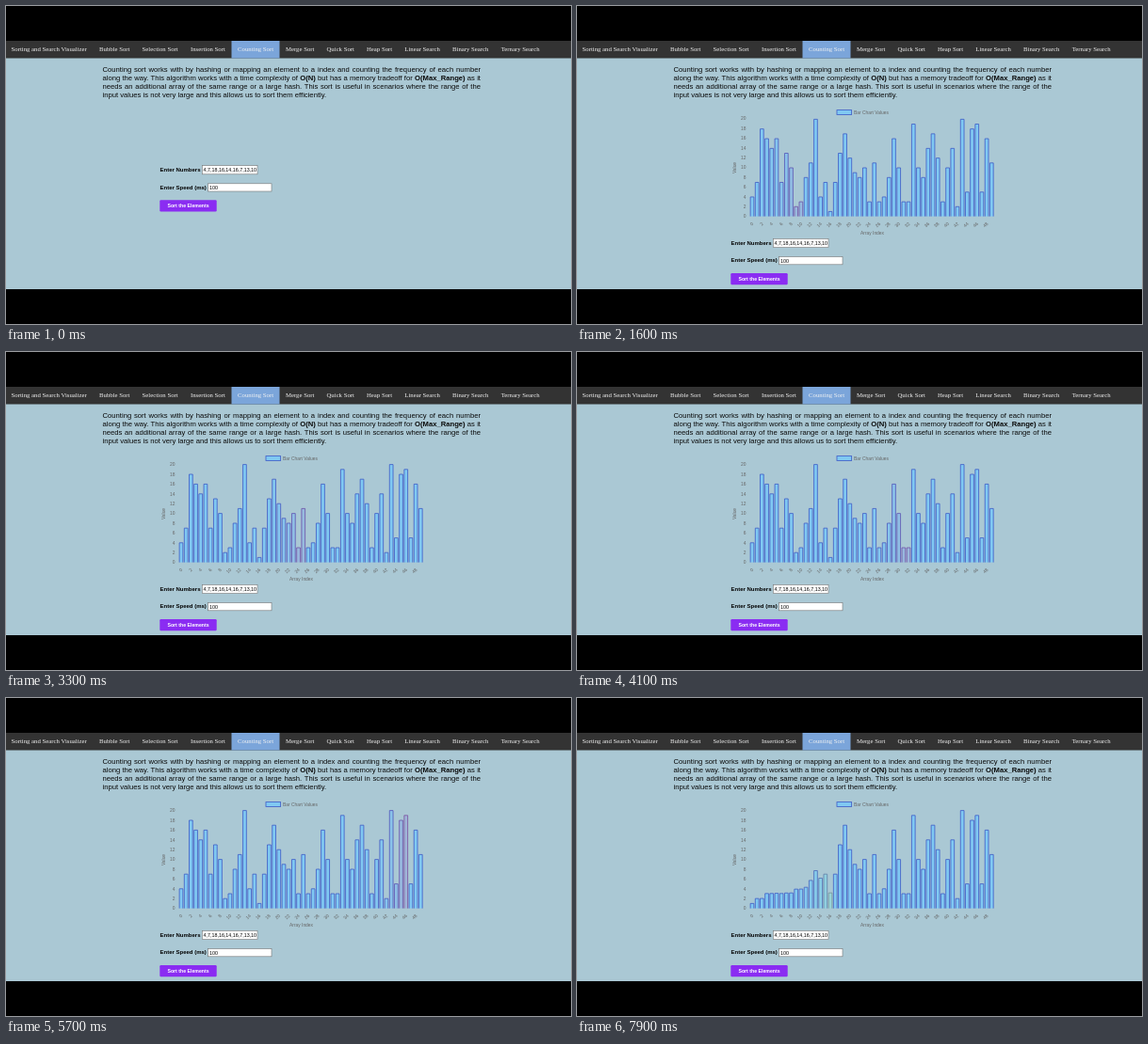
Write an HTML page that moves like this. It is 600 by 338 pixels and loops after 8000 ms.

```html
<!DOCTYPE html>
<html lang="en">
<head>
<meta charset="utf-8">
<title>Counting Sort</title>
<style>
html, body { margin: 0; width: 100%; height: 100%; overflow: hidden; background: #000; }
#stage { position: absolute; left: 0; top: 0; width: 600px; height: 338px; overflow: hidden; }
svg { position: absolute; left: 0; top: 0; }
svg text { font-family: "Liberation Sans", Arial, sans-serif; }
#nav text { font: 6.75px "Liberation Serif", "Times New Roman", serif; fill: #f2f2f2; }
#intro { position: absolute; left: 102.5px; top: 63.2px; width: 401.5px; color: #0a0a0a;
  font: 7.66px/9px "Liberation Sans", Arial, sans-serif; }
#intro div { white-space: nowrap; text-align: justify; text-align-last: justify; }
#intro div:last-child { text-align-last: left; }
#form .label { font-size: 6px; font-weight: bold; fill: #050505; }
#form .field { font-size: 5.35px; fill: #000; }
#form .box { fill: #fff; stroke: #767676; stroke-width: .6; }
#form .go { font-size: 5.2px; font-weight: bold; fill: #fff; }
#chart text { font-size: 4.9px; fill: #666; }
#chart rect, #bars path { stroke-width: .85; }
</style>
</head>
<body>
<div id="stage">
  <svg width="600" height="338" viewBox="0 0 600 338">
    <rect y="37" width="600" height="264" fill="#aac8d4"/>
    <rect y="37" width="600" height="18.5" fill="#333"/>
    <rect x="239.5" y="37" width="51" height="18.5" fill="#7ba5da"/>
    <g id="nav"></g>
    <g id="form">
      <text class="label" x="163.5" y="176">Enter Numbers</text>
      <rect class="box" x="208.3" y="169.6" width="58.7" height="9.2"/>
      <text class="field" x="209.6" y="176.2">4,7,18,16,14,16,7,13,10</text>
      <text class="label" x="163.5" y="194.5">Enter Speed (ms)</text>
      <rect class="box" x="214.6" y="188.8" width="67.4" height="8.2"/>
      <text class="field" x="216" y="194.8">100</text>
      <rect x="163.3" y="206.2" width="60.4" height="12.2" rx="1.2" fill="#8a2cf2"/>
      <text class="go" x="193.5" y="214.2" text-anchor="middle">Sort the Elements</text>
    </g>
    <g id="chart">
      <rect id="key" x="276" y="110.6" width="15.6" height="4.9"/>
      <text x="294" y="114.9">Bar Chart Values</text>
      <text x="313.5" y="242.7" text-anchor="middle">Array Index</text>
      <text transform="translate(169.4 172) rotate(-90)" text-anchor="middle">Value</text>
      <g id="ticks"></g>
      <g id="bars"></g>
    </g>
  </svg>
  <div id="intro">
    <div>Counting sort works with by hashing or mapping an element to a index and counting the frequency of each number</div>
    <div>along the way. This algorithm works with a time complexity of <b>O(N)</b> but has a memory tradeoff for <b>O(Max_Range)</b> as it</div>
    <div>needs an additional array of the same range or a large hash. This sort is useful in scenarios where the range of the</div>
    <div>input values is not very large and this allows us to sort them efficiently.</div>
  </div>
</div>
<script>
const LOOP = 8000, SHOW = 300;
const COUNT = { start: 400, step: 113 };
const WRITE = { start: 6046, step: 108.7 };
const LEFT = 183.4, PITCH = 5.19, BAR = 3.74, BASE = 223.6, UNIT = 5.2;
const FILL = [128, 201, 242], EDGE = [66, 96, 200];
const RED = { fill: [224, 138, 160], edge: [255, 60, 80] };
const LIME = { fill: [200, 235, 160], edge: [228, 255, 70] };

const values = [4, 7, 18, 16, 14, 16, 7, 13, 10, 2, 3, 8, 11, 20, 4, 7, 1, 7, 13, 17, 12, 9, 8, 10, 3,
  11, 3, 4, 8, 16, 10, 3, 3, 19, 10, 8, 14, 17, 12, 3, 10, 14, 2, 20, 5, 18, 19, 5, 16, 11];
const sorted = [...values].sort((a, b) => a - b);

const $ = id => document.getElementById(id);
function add(parent, tag, attrs, text) {
  const el = document.createElementNS('http://www.w3.org/2000/svg', tag);
  for (const k in attrs) el.setAttribute(k, attrs[k]);
  if (text !== undefined) el.textContent = text;
  parent.appendChild(el);
  return el;
}

const menu = { 'Sorting and Search Visualizer': 5.5, 'Bubble Sort': 99, 'Selection Sort': 144.6,
  'Insertion Sort': 195.9, 'Counting Sort': 246, 'Merge Sort': 297, 'Quick Sort': 340.5,
  'Heap Sort': 383, 'Linear Search': 423.3, 'Binary Search': 474, 'Ternary Search': 525.7 };
for (const name in menu) add($('nav'), 'text', { x: menu[name], y: 48.2 }, name);

const center = i => LEFT + PITCH * (i + .5);
for (let v = 0; v <= 20; v += 2)
  add($('ticks'), 'text', { x: 179.4, y: BASE - v * UNIT + 1.7, 'text-anchor': 'end' }, v);
for (let i = 0; i < 50; i += 2)
  add($('ticks'), 'text', {
    transform: `translate(${center(i) + .6} 230.6) rotate(-45)`, y: 1.6, 'text-anchor': 'end'
  }, i);
const bars = values.map(() => add($('bars'), 'path', {}));

// Every update restarts a quartic ease-out lasting ten steps; this is the part left after k steps.
function left(k) {
  if (k <= 0) return 1;
  const n = Math.floor(k);
  return .9 ** (4 * n) * (1 - .1 * (k - n)) ** 4;
}
// Marker colour eases in for one step, then eases back out.
function glow(k) {
  if (k <= 0) return 0;
  return k < 1 ? 1 - left(k) : (1 - left(1)) * left(k - 1);
}
const steps = (phase, t) => (t - phase.start) / phase.step;
const mix = (a, b, m) => a.map((v, i) => v + (b[i] - v) * m);
const rgb = c => `rgb(${c.map(Math.round)})`;
function paint(el, fill, edge) {
  el.setAttribute('fill', rgb(fill));
  el.setAttribute('stroke', rgb(edge));
}

function draw(t) {
  const shown = t >= SHOW;
  $('chart').setAttribute('visibility', shown ? 'visible' : 'hidden');
  $('form').setAttribute('transform', `translate(0 ${shown ? 77.8 : 0})`);
  if (!shown) return;

  const c = steps(COUNT, t), w = steps(WRITE, t);
  const grown = 1 - left(c + 1);
  bars.forEach((bar, i) => {
    const v = sorted[i] + (values[i] * grown - sorted[i]) * left(w - i);
    const x = center(i) - BAR / 2, y = BASE - v * UNIT;
    bar.setAttribute('d', `M${x} ${BASE}V${y}h${BAR}V${BASE}`);
    const red = glow(c - i), lime = glow(w - i);
    paint(bar,
      mix(mix(FILL, RED.fill, red), LIME.fill, lime),
      mix(mix(EDGE, RED.edge, red), LIME.edge, lime));
  });

  const first = k => k >= 0 && k < 1;
  const key = first(c) ? RED : first(w) ? LIME : { fill: FILL, edge: EDGE };
  paint($('key'), key.fill, key.edge);
}

function frame() {
  draw(performance.now() % LOOP);
  requestAnimationFrame(frame);
}
frame();
</script>
</body>
</html>
```
